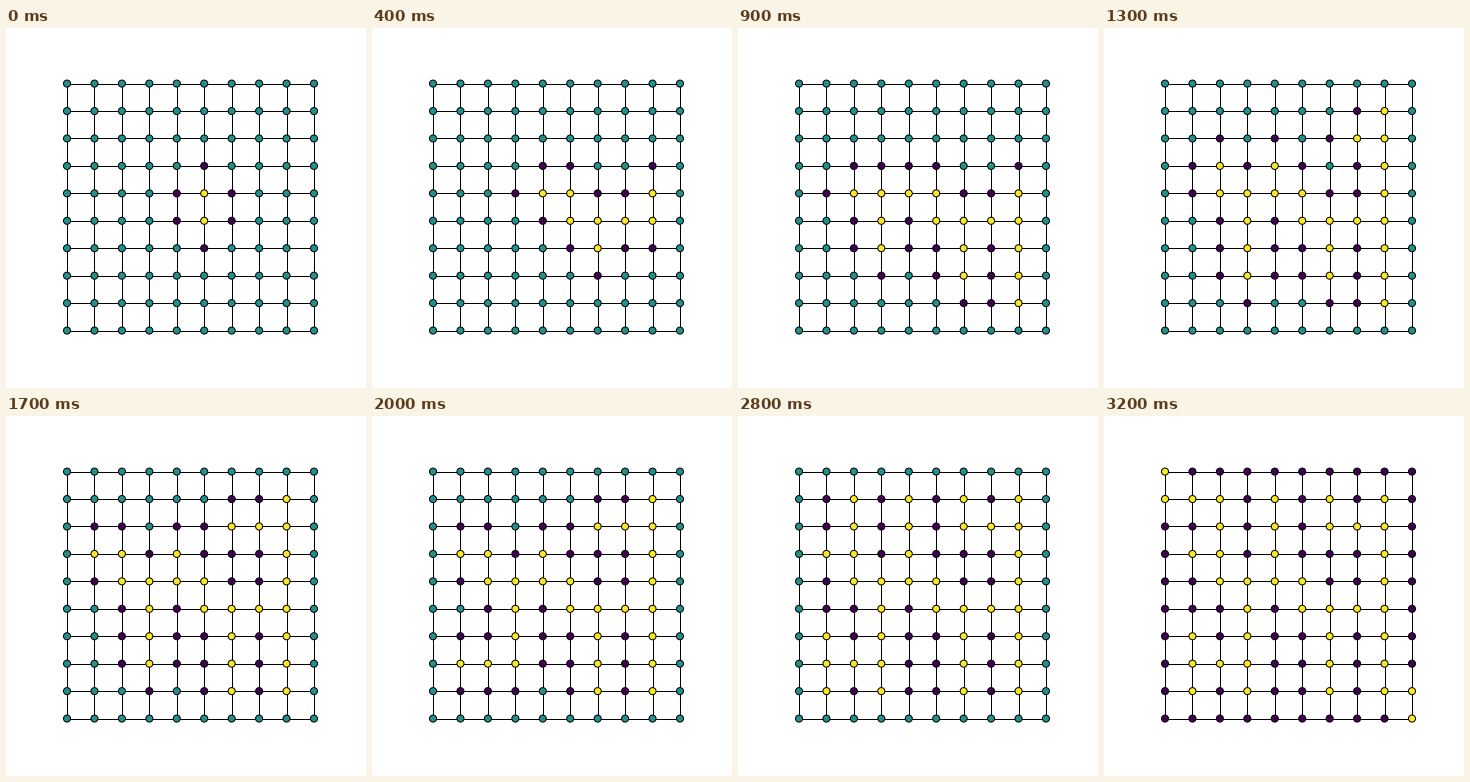
Recreate the animation shown at these times as a matplotlib script. Size 360 px wide and 360 px high, loop 3300 ms.

```python
import numpy as np
import matplotlib.pyplot as plt
from matplotlib.animation import FuncAnimation
from matplotlib.collections import LineCollection

SIZE, DPI = 360, 72
N, GAP = 10, 27.44
CENTER_X, CENTER_Y = 184.5, 179.08
FRAMES, INTERVAL = 33, 100
LAST = FRAMES - 1
WALL, UNSEEN, PATH = 0.0, 0.5, 1.0
MOVES = {"U": (-1, 0), "D": (1, 0), "L": (0, -1), "R": (0, 1)}

# Step at which each cell becomes part of the path
opened = np.full((N, N), np.inf)


def carve(start, row, col, moves, pace=1):
    """Walk from a cell, opening one neighbour every `pace` steps."""
    for i, move in enumerate(moves):
        row, col = row + MOVES[move][0], col + MOVES[move][1]
        opened[row, col] = min(opened[row, col], start + i * pace)


opened[4:6, 5] = 0
# East wing
carve(1, 5, 5, "RRRU")
carve(4, 5, 6, "DD")
carve(6, 5, 8, "DDD")
carve(10, 4, 8, "UUU")
carve(12, 2, 8, "LL", 3)
carve(17, 7, 6, "D")
carve(28, 2, 6, "U")
# West wing
carve(3, 4, 5, "LLL", 2)
carve(7, 4, 3, "DDD", 2)
carve(13, 4, 2, "UL", 4)
carve(13, 4, 4, "UU", 11)
carve(18, 7, 3, "L")
carve(20, 7, 2, "LUDD", 0.5)
carve(21, 7, 3, "D")
carve(25, 3, 2, "UU", 0)
carve(27, 2, 4, "U")
carve(30, 1, 2, "L")
# Entrance and exit
carve(LAST, 1, 1, "LU", 0)
carve(LAST, 8, 8, "RD", 0)


def maze(step):
    """Path cells, the walls beside them, and the cells not yet seen."""
    path = opened <= step
    beside = np.zeros_like(path)
    for shift in MOVES.values():
        beside |= np.roll(path, shift, axis=(0, 1))
    beside[[0, -1], :] = beside[:, [0, -1]] = False
    wall = beside | (step == LAST)
    return np.where(path, PATH, np.where(wall, WALL, UNSEEN))


fig = plt.figure(figsize=(SIZE / DPI, SIZE / DPI), dpi=DPI, facecolor="white")
ax = fig.add_axes([0, 0, 1, 1])
ax.set(xlim=(0, SIZE), ylim=(SIZE, 0))
ax.axis("off")

offsets = GAP * (np.arange(N) - (N - 1) / 2)
xs, ys = CENTER_X + offsets, CENTER_Y + offsets
edges = [[(a, y), (b, y)] for y in ys for a, b in zip(xs, xs[1:])]
edges += [[(x, a), (x, b)] for x in xs for a, b in zip(ys, ys[1:])]
ax.add_collection(LineCollection(edges, colors="black", linewidths=1, zorder=1))

gx, gy = np.meshgrid(xs, ys)
nodes = ax.scatter(gx.ravel(), gy.ravel(), c=maze(0).ravel(), s=50,
                   cmap="viridis", vmin=WALL, vmax=PATH,
                   edgecolors="black", linewidths=1, zorder=2)


def update(step):
    nodes.set_array(maze(step).ravel())
    return nodes,


anim = FuncAnimation(fig, update, frames=FRAMES, interval=INTERVAL,
                     repeat=True, repeat_delay=0)
plt.show()
```
